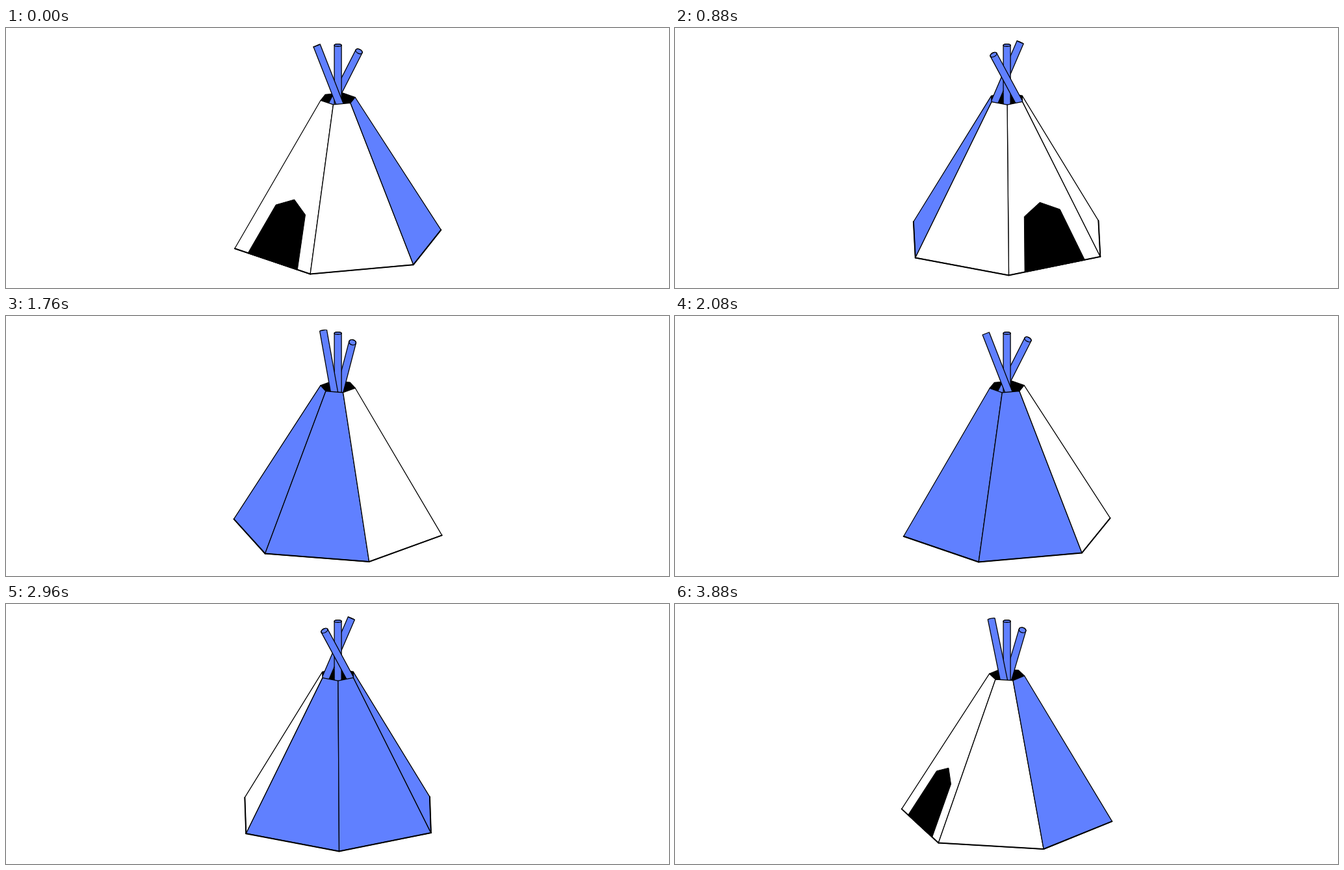
An HTML page with a canvas for the animation above (3.92 s loop, 1020 px wide and 400 px high).

```html
<!DOCTYPE html>
<html lang="en">
<head>
<meta charset="utf-8">
<title>Turning tepee</title>
<style>
  html, body { margin: 0; width: 100%; height: 100%; overflow: hidden; background: #fff; }
  canvas { display: block; }
</style>
</head>
<body>
<canvas id="stage" width="1020" height="400"></canvas>
<script>
const ctx = document.getElementById('stage').getContext('2d');
const BLUE = '#6080ff', WHITE = '#fff', BLACK = '#000';
const PANELS = [WHITE, WHITE, BLUE, BLUE, BLUE, WHITE];
const STEP = 40, STEPS = 98, TURN = 3.455, START = -75;
const CX = 510.6, TILT = 0.338, UP = Math.sqrt(1 - TILT * TILT);
const BASE = { r: 164.3, y: 324.9 }, RIM = { r: 27.4, y: 108.9 };
const POLE_R = 5.5, THIN = 1.3, THICK = 2;
// Door corners: share along the base edge, share up the panel's first side
const DOOR = [[0.175, 0], [0.175, 0.325], [0.346, 0.39], [0.565, 0.325], [0.83, 0]];

const rad = deg => deg * Math.PI / 180;

// Point on a horizontal ring: screen x, y and depth z towards the viewer
function ring(r, y, deg) {
  const z = r * Math.cos(rad(deg));
  return { x: CX + r * Math.sin(rad(deg)), y: y + z * TILT, z };
}

function trace(points) {
  points.forEach((p, i) => i ? ctx.lineTo(p.x, p.y) : ctx.moveTo(p.x, p.y));
}

function shape(points, fill, line) {
  ctx.beginPath();
  trace(points);
  ctx.closePath();
  ctx.fillStyle = fill;
  ctx.fill();
  ctx.lineWidth = line;
  ctx.stroke();
}

// Cylinder from foot to top, with its end disc when that faces the viewer
function pole(top, foot) {
  const dx = top.x - foot.x, dy = top.y - foot.y, dz = top.z - foot.z;
  const rise = (dz * TILT - dy) / UP;
  const facing = (rise * TILT + dz * UP) / Math.hypot(dx, rise, dz);
  const angle = Math.atan2(dy, dx), flat = POLE_R * Math.abs(facing);
  const nx = -Math.sin(angle) * POLE_R, ny = Math.cos(angle) * POLE_R;
  const end = { x: foot.x - dx * 0.12, y: foot.y - dy * 0.12 };
  ctx.beginPath();
  ctx.moveTo(end.x - nx, end.y - ny);
  ctx.ellipse(top.x, top.y, flat, POLE_R, angle, -Math.PI / 2, Math.PI / 2);
  ctx.lineTo(end.x + nx, end.y + ny);
  ctx.fillStyle = BLUE;
  ctx.fill();
  ctx.lineWidth = THIN;
  ctx.stroke();
  if (facing > 0) {
    ctx.beginPath();
    ctx.ellipse(top.x, top.y, flat, POLE_R, angle, 0, 2 * Math.PI);
    ctx.stroke();
  }
}

function leaningPole(turn) {
  pole(ring(35, 31.5, turn - 37), ring(20, 116.5, turn + 90));
}

function drawPoles(turn, rim) {
  ctx.save();
  ctx.beginPath();
  ctx.rect(0, 0, 1020, 106);
  trace([...rim].reverse());
  ctx.closePath();
  ctx.clip();
  const front = Math.cos(rad(turn + 34)) > 0 ? turn : turn + 180;
  leaningPole(front + 180);
  pole(ring(0, 26.4, 0), ring(0, 116.5, 0));
  leaningPole(front);
  ctx.restore();
}

function draw(turn) {
  ctx.clearRect(0, 0, 1020, 400);
  ctx.lineJoin = ctx.lineCap = 'round';
  ctx.strokeStyle = BLACK;
  const corners = ({ r, y }) => PANELS.map((_, i) => ring(r, y, turn + 60 * i));
  const base = corners(BASE), rim = corners(RIM);

  shape(rim, BLACK, THIN);
  drawPoles(turn, rim);

  PANELS.forEach((fill, i) => {
    const a = base[i], b = base[(i + 1) % 6], c = rim[(i + 1) % 6], d = rim[i];
    const visible = (b.x - a.x) * (d.y - a.y) - (b.y - a.y) * (d.x - a.x) < 0;
    if (!visible) return;
    shape([a, b, c, d], fill, THIN);
    if (i === 0) {
      shape(DOOR.map(([u, v]) => ({
        x: a.x + u * (b.x - a.x) + v * (d.x - a.x),
        y: a.y + u * (b.y - a.y) + v * (d.y - a.y)
      })), BLACK, 1);
    }
    ctx.beginPath();
    trace([a, b]);
    ctx.lineWidth = THICK;
    ctx.stroke();
  });
}

const begin = performance.now();
function tick() {
  const step = Math.floor((performance.now() - begin) / STEP) % STEPS;
  draw(START + TURN * step);
  requestAnimationFrame(tick);
}
tick();
</script>
</body>
</html>
```
